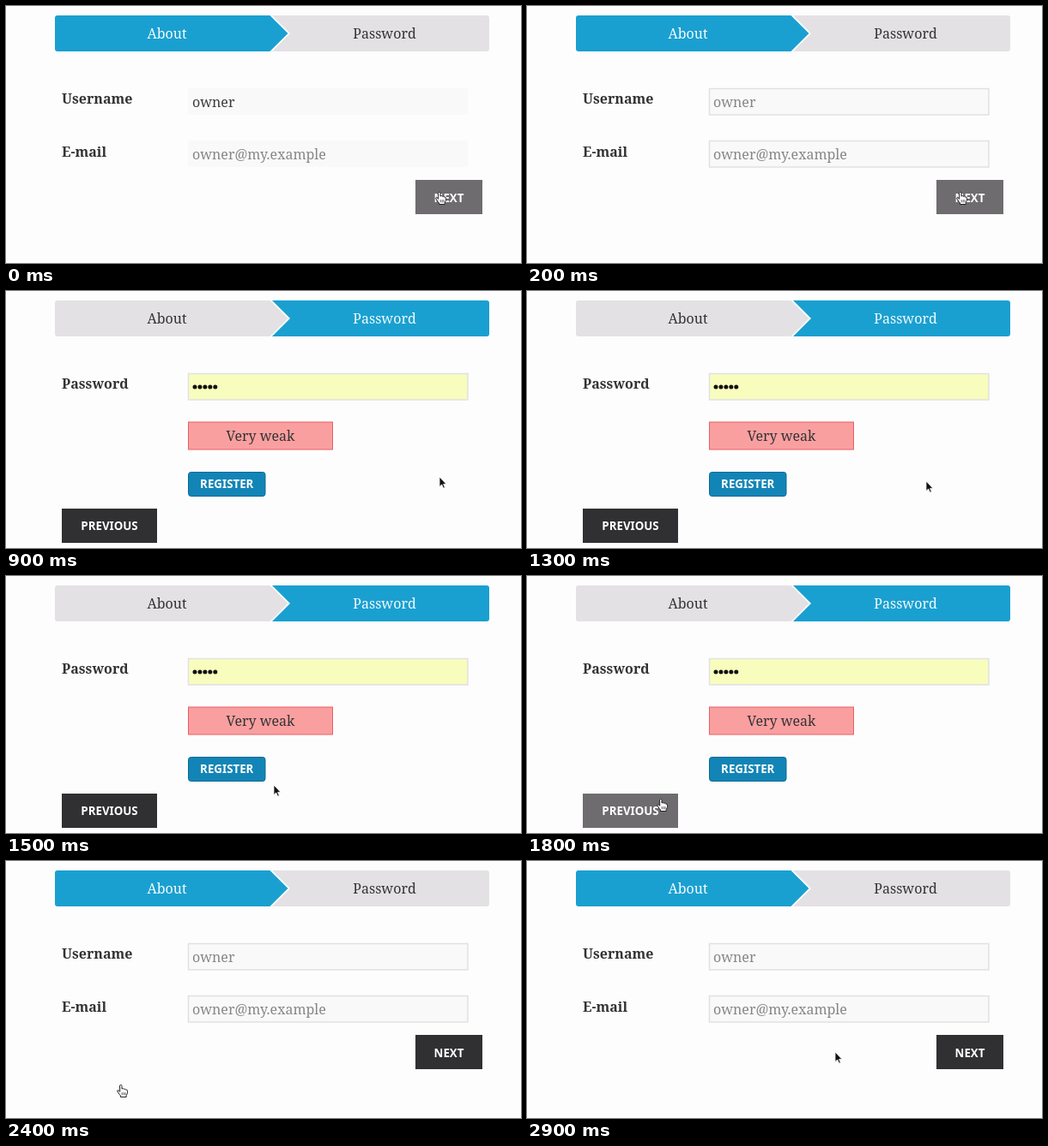
Recreate the animation shown at these times as an HTML page. Size 600 px wide and 300 px high, loop 3000 ms.

```html
<!DOCTYPE html>
<html lang="en">
<head>
<meta charset="utf-8">
<title>Two-step registration form</title>
<style>
  html, body { margin: 0; width: 100%; height: 100%; overflow: hidden; background: #fefdfe; }
  svg { display: block; width: 600px; height: 300px; }

  text { font: 16px "Noto Serif", serif; fill: #333; }
  .label { font-weight: 700; }
  .mid { text-anchor: middle; }
  .on { fill: #f4fbfe; }
  .value { fill: #868686; }
  .caps { font: 700 13.3px "Noto Sans", sans-serif; fill: #fff; text-anchor: middle; }

  .active { fill: #1aa0d0; }
  .idle { fill: #e4e1e4; }
  .field { fill: #f9f9f9; }
  .edge { fill: none; stroke: #e1e1e3; stroke-width: 1.5; }
  .button { fill: #303032; }

  /* Everything shares one 3 s clock and changes in hard steps. */
  .about, .security, .edge.soft, .name, .next, .previous, .cursor, .arrow, .hand {
    animation: 3s step-end infinite;
  }
  .about { animation-name: about; }
  .security { animation-name: security; }
  .edge.soft { animation-name: settle; }
  .name { animation-name: name; }
  .next { animation-name: next; }
  .previous { animation-name: previous; }
  .cursor { animation-name: move; }
  .arrow { animation-name: arrow; }
  .hand { animation-name: hand; }

  @keyframes about {
    0%, 80% { visibility: visible; }
    30% { visibility: hidden; }
  }
  @keyframes security {
    0%, 80% { visibility: hidden; }
    30% { visibility: visible; }
  }
  @keyframes settle {
    0% { opacity: 0; }
    3.333% { opacity: .5; }
    6.666% { opacity: 1; }
  }
  @keyframes name {
    0% { fill: #3c3c3c; }
    3.333% { fill: #666; }
    6.666% { fill: #868686; }
  }
  @keyframes next {
    0% { fill: #6e6c6f; }
    30% { fill: #303032; }
  }
  @keyframes previous {
    0%, 80% { fill: #303032; }
    60% { fill: #6e6c6f; }
  }
  @keyframes arrow {
    0%, 60% { visibility: hidden; }
    30%, 90% { visibility: visible; }
  }
  @keyframes hand {
    0%, 60% { visibility: visible; }
    30%, 90% { visibility: hidden; }
  }
  @keyframes move {
    0% { transform: translate(505px, 217px); }
    43.333% { transform: translate(465px, 222px); }
    46.666% { transform: translate(394px, 233px); }
    50% { transform: translate(312px, 244px); }
    53.333% { transform: translate(242px, 252px); }
    56.666% { transform: translate(188px, 257px); }
    60% { transform: translate(156px, 260px); }
    63.333% { transform: translate(143px, 261px); }
    66.666% { transform: translate(137px, 261px); }
    70% { transform: translate(134px, 261px); }
    90% { transform: translate(184px, 257px); }
    93.333% { transform: translate(272px, 243px); }
    96.666% { transform: translate(359px, 223px); }
  }
</style>
</head>
<body>
<svg viewBox="0 0 600 300">
  <defs>
    <path id="first" d="M60 11H307.500L328.500 32L307.500 53H60Q57 53 57 50V14Q57 11 60 11Z"/>
    <path id="second" d="M310 11H560Q563 11 563 14V50Q563 53 560 53H310L331 32Z"/>
  </defs>

  <g class="about">
    <use href="#first" class="active"/>
    <use href="#second" class="idle"/>
    <text class="mid on" x="187.500" y="38">About</text>
    <text class="mid" x="441" y="38">Password</text>

    <text class="label" x="65" y="114">Username</text>
    <rect class="field" x="212" y="96" width="326" height="31"/>
    <rect class="edge soft" x="212.500" y="96.500" width="325.500" height="30.500"/>
    <text class="value name" x="217" y="118">owner</text>

    <text class="label" x="65" y="175.500">E-mail</text>
    <rect class="field" x="212" y="157" width="326" height="31"/>
    <rect class="edge soft" x="212.500" y="157.500" width="325.500" height="30.500"/>
    <text class="value" x="217" y="179">owner@my.example</text>

    <rect class="button next" x="477" y="203" width="78" height="40"/>
    <text class="caps" x="516" y="228.500">NEXT</text>
  </g>

  <g class="security">
    <use href="#first" class="idle"/>
    <use href="#second" class="active"/>
    <text class="mid" x="187.500" y="38">About</text>
    <text class="mid on" x="441" y="38">Password</text>

    <text class="label" x="65" y="114">Password</text>
    <rect x="212" y="96" width="326" height="31" fill="#f8fdbd"/>
    <rect class="edge" x="212.500" y="96.500" width="325.500" height="30.500"/>
    <path d="M220 112h24.500" fill="none" stroke="#111" stroke-width="5" stroke-linecap="round" stroke-dasharray="0 5.950"/>

    <rect x="212.500" y="153" width="168" height="32" fill="#fa9fa0" stroke="#ea6062"/>
    <text class="mid" x="296.500" y="175">Very weak</text>

    <rect x="212.500" y="211.500" width="89.500" height="28" rx="3" fill="#1285b6" stroke="#0c6a94"/>
    <text class="caps" x="257.250" y="230">REGISTER</text>

    <rect class="button previous" x="65" y="254" width="111" height="40"/>
    <text class="caps" x="120.500" y="279">PREVIOUS</text>
  </g>

  <g class="cursor">
    <path class="arrow" d="M0 0V11.500L2.700 9L4.600 13.200L6.400 12.400L4.600 8.400H8Z" fill="#111" stroke="#fff" stroke-width=".8"/>
    <g class="hand" stroke="#222" stroke-linejoin="round" stroke-linecap="round">
      <path d="M-1.500 1.500Q-1.500 .3 -.3 .3T1 1.500V5Q2.600 4 3.500 5.300Q5 4.600 5.700 6Q7.500 5.600 7.500 7.500V9.500Q7.300 11 6.200 12.500V14.500H-.5V13Q-1.800 11.800 -2.700 10L-4.200 8Q-4.600 6.500 -3.200 6.600L-1.500 8Z" fill="#fff"/>
      <path d="M1.200 9.500V12M3.200 9.500V12M5 9.500V12" fill="none" stroke-width=".7"/>
    </g>
  </g>
</svg>
</body>
</html>
```
